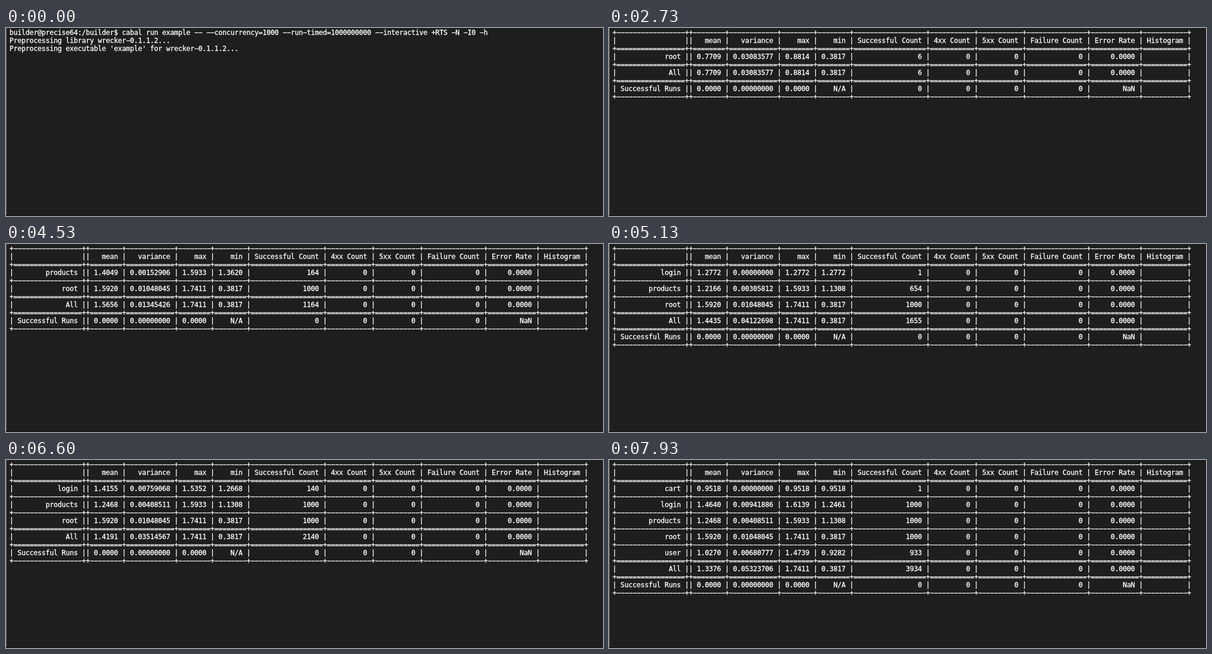
An HTML page with a canvas for the animation above (8 s loop, 1040 px wide and 328 px high).

```html
<!DOCTYPE html>
<html lang="en">
<head>
<meta charset="utf-8">
<title>Terminal load test</title>
<style>
  html, body { margin: 0; width: 100%; height: 100%; overflow: hidden; background: #1e1e1e; }
  canvas { display: block; }
</style>
</head>
<body>
<canvas id="screen" width="1040" height="328"></canvas>
<script>
const LOOP = 8000;
const RUN_AT = 1665, TABLE_AT = 1915, REFRESH = 340;
const CELL_W = 7, CELL_H = 14, LEFT = 6, BASELINE = 12.3;
const ctx = document.getElementById('screen').getContext('2d');

const SHELL = [
  'builder@precise64:/builder$ cabal run example -- --concurrency=1000 --run-timed=1000000000 --interactive +RTS -N -I0 -h',
  'Preprocessing library wrecker-0.1.1.2...',
  "Preprocessing executable 'example' for wrecker-0.1.1.2..."
];

const HEADERS = ['', 'mean', 'variance', 'max', 'min', 'Successful Count',
  '4xx Count', '5xx Count', 'Failure Count', 'Error Rate', 'Histogram'];

// A row starts with one sample at a refresh, then eases through its key points.
function endpoint(name, start, sample, ...points) {
  const first = { at: start, count: 1, mean: sample, variance: 0, max: sample, min: sample };
  return { name, keys: [first, ...points] };
}

const ENDPOINTS = [
  endpoint('cart', 16, 0.9518),
  endpoint('login', 9, 1.2772,
    { at: 12, count: 33, mean: 1.3913, variance: 0.00667659, max: 1.4958, min: 1.2772 },
    { at: 15, count: 1000, mean: 1.4640, variance: 0.00941886, max: 1.6139, min: 1.2461 }),
  endpoint('products', 5, 1.5933,
    { at: 9, count: 654, mean: 1.2166, variance: 0.00305812, max: 1.5933, min: 1.1308 },
    { at: 11, count: 1000, mean: 1.2468, variance: 0.00408511, max: 1.5933, min: 1.1308 }),
  endpoint('root', 1, 0.3817,
    { at: 2, count: 6, mean: 0.7709, variance: 0.03083577, max: 0.8814, min: 0.3817 },
    { at: 5, count: 647, mean: 1.5651, variance: 0.01340870, max: 1.6521, min: 0.3817 },
    { at: 7, count: 1000, mean: 1.5920, variance: 0.01048045, max: 1.7411, min: 0.3817 }),
  endpoint('user', 14, 1.4739,
    { at: 15, count: 129, mean: 1.1047, variance: 0.00494430, max: 1.4739, min: 1.0357 },
    { at: 17, count: 933, mean: 1.0270, variance: 0.00680777, max: 1.4739, min: 0.9282 })
];

function statAt({ name, keys }, refresh) {
  const a = keys.findLast(key => key.at <= refresh);
  const b = keys.find(key => key.at > refresh);
  if (!b) return { ...a, name };
  const p = (refresh - a.at) / (b.at - a.at);
  const mix = (field, amount = p) => a[field] + (b[field] - a[field]) * amount;
  return {
    name, count: Math.round(mix('count', p * p)), mean: mix('mean'),
    variance: mix('variance'), max: mix('max'), min: mix('min')
  };
}

function emptyStat(name) {
  return { name, count: 0, mean: 0, variance: 0, max: 0, min: 0 };
}

function pool(stats) {
  if (!stats.length) return emptyStat('All');
  const total = value => stats.reduce((sum, s) => sum + value(s), 0);
  const count = total(s => s.count);
  const mean = total(s => s.count * s.mean) / count;
  const variance = total(s => s.count * (s.variance + (s.mean - mean) ** 2)) / count;
  return {
    name: 'All', count, mean, variance,
    max: Math.max(...stats.map(s => s.max)),
    min: Math.min(...stats.map(s => s.min))
  };
}

function cells({ name, count, mean, variance, max, min }) {
  return [name, mean.toFixed(4), variance.toFixed(8), max.toFixed(4),
    count ? min.toFixed(4) : 'N/A', String(count), '0', '0', '0',
    count ? '0.0000' : 'NaN', ''];
}

function tableLines(refresh) {
  const stats = ENDPOINTS.filter(e => e.keys[0].at <= refresh).map(e => statAt(e, refresh));
  const rows = stats.map(cells);
  const all = cells(pool(stats));
  const runs = cells(emptyStat('Successful Runs'));

  const everyRow = [HEADERS, ...rows, all, runs];
  const widths = HEADERS.map((_, i) => Math.max(...everyRow.map(row => row[i].length)));
  const join = (parts, edge) =>
    edge + parts[0] + edge + edge + parts.slice(1).join(edge) + edge;
  const rule = ch => join(widths.map(w => ch.repeat(w + 2)), '+');
  const line = row => join(row.map((text, i) => ' ' + text.padStart(widths[i]) + ' '), '|');

  const body = rows.flatMap((row, i) => i ? [rule('-'), line(row)] : [line(row)]);
  return [rule('-'), line(HEADERS), rule('='), ...body,
    rule('='), line(all), rule('='), line(runs), rule('-')];
}

function linesAt(time) {
  if (time >= TABLE_AT) return tableLines(Math.floor((time - TABLE_AT) / REFRESH));
  return time >= RUN_AT ? [...SHELL, 'Running example...'] : SHELL;
}

function draw(lines) {
  ctx.fillStyle = '#1e1e1e';
  ctx.fillRect(0, 0, 1040, 328);
  ctx.fillStyle = '#777';
  ctx.fillRect(0, 0, 1, 326);
  ctx.fillStyle = '#111';
  ctx.fillRect(0, 327, 1040, 1);

  ctx.font = '12px "DejaVu Sans Mono", monospace';
  ctx.fillStyle = ctx.strokeStyle = '#fff';
  ctx.lineWidth = 0.3;
  lines.forEach((text, row) => {
    // The minus sign gives the wide dashes of the terminal font.
    [...text.replaceAll('-', '\u2212')].forEach((ch, col) => {
      const x = LEFT + col * CELL_W, y = BASELINE + row * CELL_H;
      ctx.fillText(ch, x, y);
      ctx.strokeText(ch, x, y);
    });
  });
}

let shown = '';
function frame() {
  const lines = linesAt(performance.now() % LOOP);
  const text = lines.join('\n');
  if (text !== shown) draw(lines);
  shown = text;
  requestAnimationFrame(frame);
}
frame();
</script>
</body>
</html>
```
